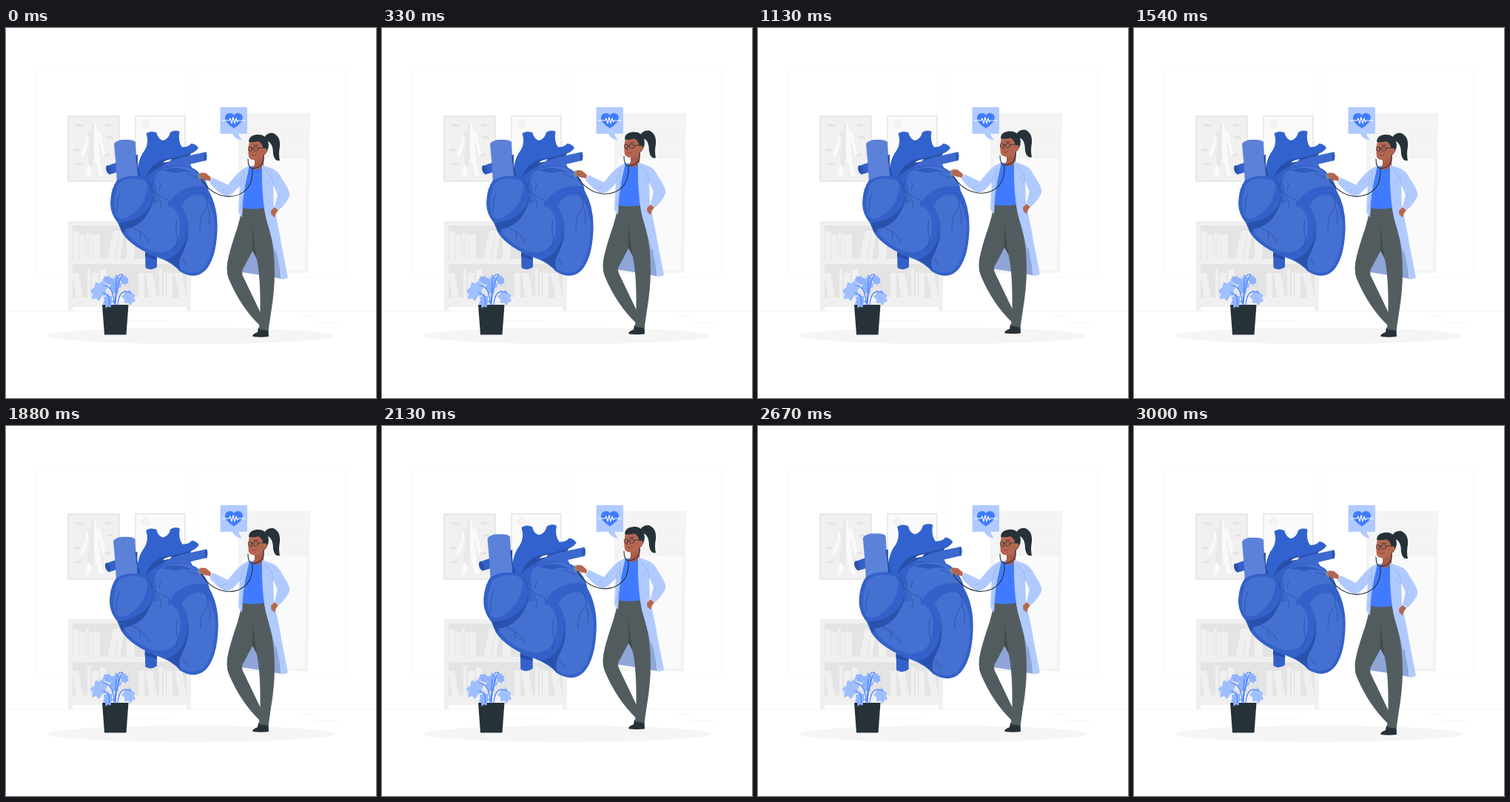
These frames come from a looping animation (500 by 500 pixels, 3.04 s). An HTML page:

```html
<!DOCTYPE html>
<html lang="en">
<head>
<meta charset="utf-8">
<title>Cardiology check</title>
<style>
  html, body { margin: 0; width: 100%; height: 100%; overflow: hidden; background: #fff; }
  svg { display: block; width: 100%; height: 100%; }
  .line { fill: none; stroke-linecap: round; stroke-linejoin: round; }
</style>
</head>
<body>
<svg viewBox="0 0 500 500">
  <!-- room -->
  <g fill="none" stroke="#f9f9f9">
    <rect x="39.5" y="55.5" width="203" height="282" rx="2"/>
    <rect x="254.5" y="55.5" width="204" height="282" rx="2"/>
    <path stroke="#f5f5f5" d="M0 382.500H500M165 395.500H224M400 389.500H416M417 398.500H448"/>
  </g>
  <ellipse cx="250" cy="416" rx="194" ry="11" fill="#f5f5f5"/>

  <!-- anatomy poster -->
  <rect x="84" y="119" width="69" height="88" fill="#f0f0f0" stroke="#e4e4e4" stroke-width="1.600"/>
  <path class="line" stroke="#fafafa" stroke-width="4" d="M112 142L108 158L103 172M126 142L129 157L133 172"/>
  <path d="M115 130Q119 124 122.500 130L122 137L128 140L125 155L126 168L128 184L132 200H126L119 172L114 201H107L111 183L111 168L113 155L110 140L116 137Z" fill="#fafafa"/>
  <path d="M119 127V172L116 190L111 183L111 168L113 155L110 140L116 137L115 130Z" fill="#e8e8e8"/>
  <path d="M94 131.500H104M133 131.500H142M136 148H145M91 165H100M133 172H141M93 184H103" stroke="#e4e4e4" stroke-width="3"/>

  <!-- small poster -->
  <rect x="175" y="119" width="67" height="88" fill="#fafafa" stroke="#e6e6e6" stroke-width="1.600"/>
  <circle cx="188.500" cy="129" r="6.500" fill="#f3f3f3"/>

  <!-- window blind -->
  <path d="M314 115H411L408 331H314Z" fill="#f3f3f3"/>
  <path d="M319 119H407L404 327H319Z" fill="#fafafa"/>
  <path d="M315 116H410L409 176H315Z" fill="#f5f5f5"/>
  <g id="slats" stroke="#f0f0f0" stroke-width=".8"></g>

  <!-- shelf -->
  <path d="M84 261H250V383H244V377H90V383H84Z" fill="#f0f0f0"/>
  <path d="M90 267H244V312H90ZM90 319H244V364H90Z" fill="#e4e4e4"/>
  <g id="books" fill="#f0f0f0"></g>

  <!-- heart -->
  <g id="heart">
    <path d="M188 296H204V323Q196 329 188.500 324Z" fill="#3461c9"/>
    <path d="M188 304L204 310V313L188 309Z" fill="#264da8"/>
    <path d="M136 186.500L153 180.500V194L140 198Q134 194 136 186.500Z" fill="#3461c9"/>
    <ellipse cx="138.500" cy="191.500" rx="3" ry="6" transform="rotate(-18 138.500 191.500)" fill="#2a52ad"/>
    <path d="M177 206Q177 178 187 166Q192 158 191 149L189.500 142.500Q195 138 203.500 141.500Q205 150 212 152Q220 150 222 141Q228 137 234.500 140Q232 153 238 161Q247 161 250.500 156Q257 157 260 162Q256 168 247 171L233 176Q211 177 207 208Z" fill="#3162cd"/>
    <path d="M188 207Q194 181 217 177Q236 174 250 169L246 178L217 183Q207 190 204 211Z" fill="#284fa9"/>
    <path d="M212 182Q216 177.500 224 177.500L221 180.500Z" fill="#f7f7f7"/>
    <path d="M202 194Q216 180 240 174L270 167.500Q272 173 270.500 179L249 184L256 199L208 213Z" fill="#3d69cf"/>
    <ellipse cx="269.500" cy="173.500" rx="2" ry="6" fill="#2d57b6"/>
    <path d="M150 210L148.500 185L146 156.500Q150 150.500 161 151Q172 150.500 175 154L176.500 185L179 210L164 222Z" fill="#5b82d8"/>
    <path d="M175 172L178 171Q177 190 182 199L179 208Z" fill="#284fa9"/>
    <path d="M150 206Q166 196 190 202Q201 188 219 186Q246 184 257 192Q272 205 274 220Q287 243 285.500 274Q284 311 270 327Q256 341.500 235 329Q226 318 208 311Q170 297 157 277L151 263Q139 249 141.500 230Q143 215 150 206Z" fill="#3461c9"/>
    <path d="M152 210Q166 200 185 205Q195 210 189 225Q185 243 167 254Q155 262 149 253Q142 238 152 210Z" fill="#4470d1"/>
    <path d="M190 205Q204 215 195 240Q180 262 152 263L157 276Q183 270 193 248Q205 225 190 205Z" fill="#2951ae"/>
    <path d="M199 237Q218 233 230 247Q239 263 232 287Q225 303 207 303Q184 300 166 281L160 272Q184 268 194 246Z" fill="#4470d1"/>
    <path d="M204 196Q222 184 246 188Q265 197 271 214Q252 212 238 219Q223 227 219 241Q209 239 203 232Q197 214 204 196Z" fill="#4470d1"/>
    <path d="M237 240Q248 222 267 226Q283 246 282 274Q280 309 266 326Q249 337 232 323Q227 317 222 315Q240 309 246 284Q249 258 237 240Z" fill="#4470d1"/>
    <path d="M243 262Q247 280 238 296Q230 309 216 313L236 327Q231 318 239 303Q249 284 243 262Z" fill="#2951ae"/>
    <path d="M212 193Q229 184 254 196Q240 192 230 196Z" fill="#2f5abc"/>
    <g class="line" stroke="#274b9f" stroke-width=".7">
      <path d="M197 207Q205 213 201 222Q210 229 219 232L221 242M201 222L209 235V245M209 211L207 219"/>
      <path d="M265 222Q273 230 272 242Q277 252 274 264M272 242Q261 253 262 272"/>
      <path d="M231 260Q228 272 232 287L229 299M171 270Q185 274 194 290M181 275L182 284M154 224Q149 235 150 250M238 312L245 322M245 197L258 202"/>
    </g>
  </g>

  <!-- plant -->
  <path d="M130 374H165.500L162.500 414.500H133Z" fill="#263238"/>
  <g id="leaves"></g>
  <path class="line" stroke="#407bff" stroke-width="1.100" d="M146 374Q146 350 132 347M148 374Q150 344 157 334M151 374Q153 350 169 358M140 374Q140 359 131 358M147 372L149 342M150 339Q154 329 159 335"/>

  <!-- speech bubble -->
  <path d="M291 107H324.500Q326 107 326 108.500V141.500Q326 143 324.500 143H314L318.500 152Q309 150 306 143H291Q289.500 143 289.500 141.500V108.500Q289.500 107 291 107Z" fill="#b0caff"/>
  <path d="M308 135.500Q295.500 128 296 121Q297 115 302.500 115Q306.500 115 308 118Q309.500 115 313.500 115Q319 115 320 121Q320 128 308 135.500Z" fill="#407bff"/>
  <path class="line" stroke="#fff" stroke-width="1.100" d="M292.500 125H301.500L303 122L305 129L307 120.500L309 129L311 122L312.500 127L314 125H323"/>

  <!-- doctor -->
  <g id="doctor">
    <path d="M334 290L350 255L362 262L372 339L345 334L318 330Z" fill="#8fa5d8"/>
    <path d="M345 190L361 235L381 337.500L373 340L365 300L349 258Z" fill="#b0caff"/>

    <path d="M341 405L354.500 406L355 417Q345 418.500 333.500 417Q332 414 340 411Z" fill="#263238"/>
    <path d="M319 242H341L337 294L321 324Q317 330 321 337L345 387L343 402Q317 377 301 339Q296 327 301 308Q305 292 312 272Q317 257 319 242Z" fill="#525c5f"/>
    <path d="M331 243H349Q351 260 357 274Q363 302 363 330Q363 356 358 385L354.500 409L342 407L343.500 382Q344 343 340 318Q332 285 331 243Z" fill="#535d60"/>
    <path d="M334 256Q333 280 339 312L332.500 300Z" fill="#414b4e"/>

    <path d="M327 187L346 186L349 243Q334 246 318.500 243Z" fill="#407bff"/>
    <path d="M336 174L349 168L348 186Q342 194 333 190L336 184Z" fill="#a95c48"/>
    <path d="M329 186L321 190Q312 196 300 212L279 202L275 209Q286 223 297 227Q304 228 316 213L314 249L319 256L321 222Z" fill="#b0caff"/>
    <path class="line" stroke="#8eacec" stroke-width=".7" d="M316 213L319 202M321 194L322 214L318 245M291 220L298 217"/>

    <path d="M346 185L360 190Q368 193 373 204Q383 218 383.500 226Q380 236 369 246L363 241L367 225L361 212L362 241L371 285L364 304L353 262Q345 234 346 185Z" fill="#b0caff"/>
    <path class="line" stroke="#8eacec" stroke-width=".7" d="M350 191L358 201L354 207L359 213M361 212L359 201M367 225L370 228"/>
    <path d="M363 242L368 246L364.500 251L363 256L358.500 252L358 247Z" fill="#b56650"/>

    <path d="M277 202L270 196L263 195.500L262 198L266 200L260 200L261 203L269 205L276 207Z" fill="#b56650"/>

    <!-- head -->
    <path d="M349 148Q353 141 361 142Q371 146 370 160Q368 171 370 179Q363 181 361 170Q361 156 354 153Z" fill="#263238"/>
    <path d="M330 150Q338 147 349 151L352 165Q350 175 341 178Q331 180 328 174Q326 162 330 150Z" fill="#b56650"/>
    <path d="M328 154Q328 145 339 144Q350 143 354 153Q357 162 350 171L348 164Q347 156 341 153Q336 155 328 154Z" fill="#263238"/>
    <ellipse cx="350" cy="166" rx="2.600" ry="3.500" fill="#b56650"/>
    <g class="line" stroke="#263238" stroke-width=".8">
      <ellipse cx="337.500" cy="163.300" rx="3.200" ry="3"/>
      <ellipse cx="329.800" cy="163.300" rx="2.500" ry="3"/>
      <path d="M332 162.500H334M341 162.500L350 161M335 158.500L340 158.500"/>
      <path stroke="#7d3f35" d="M332.500 164L331 168H333M332 172Q335 174 338 171"/>
    </g>

    <!-- stethoscope -->
    <path class="line" stroke="#263238" stroke-width="1.100" d="M327 177Q327 189 333 190M348 172Q350 188 333 190Q334 207 326 217Q315 229 298 227.500Q276 225 263 203"/>
    <ellipse cx="261.500" cy="200.500" rx="2.100" ry="4.300" transform="rotate(-18 261.500 200.500)" fill="#7b8c91"/>
    <path d="M262 198L271 198L277 204L270 206L264 203Z" fill="#b56650"/>
  </g>
</svg>

<script>
const byId = id => document.getElementById(id);
const LOOP = 3040;
const BOB = { period: LOOP / 2, height: 8.6 };
const BEAT = { start: 1660, peak: 2480, end: LOOP, growth: 0.09, x: 210, y: 237 };

const ease = p => (1 - Math.cos(Math.PI * Math.min(1, Math.max(0, p)))) / 2;

// Each book: left edge, width, height, lean of its top edge
const book = floor => ([x, w, h, lean]) =>
  `<path d="M${x} ${floor}l${lean} ${-h}h${w}l${-lean} ${h}z"/>`;
const upperRow = [[91, 7, 37, 0], [99, 9, 33, 0], [109, 3, 38, 0], [113, 4, 33, 0],
  [118, 9, 33, 0], [137, 9, 38, 8], [148, 6, 38, 6], [163, 10, 33, 0]];
const lowerRow = [[95, 9, 33, -6], [110, 4, 39, 0], [116, 9, 33, 0], [127, 8, 38, 0],
  [179, 8, 33, 0], [194, 10, 33, -6], [207, 4, 38, 0], [213, 3, 34, 0],
  [217, 8, 33, 0], [234, 10, 33, -6]];
byId('books').innerHTML = upperRow.map(book(312)).join('') + lowerRow.map(book(364)).join('');

byId('slats').innerHTML = Array.from({ length: 20 }, (_, i) =>
  `<path d="M316 ${117.5 + i * 3}H410"/>`).join('');

// Lobed leaf around a centre
function leaf([x, y, rx, ry, turn, color]) {
  const points = Array.from({ length: 48 }, (_, i) => {
    const a = i * Math.PI / 24;
    const r = 0.86 + 0.14 * Math.cos(7 * a);
    return `${(rx * r * Math.cos(a)).toFixed(1)},${(ry * r * Math.sin(a)).toFixed(1)}`;
  });
  return `<polygon points="${points.join(' ')}" fill="${color}"
    transform="translate(${x} ${y}) rotate(${turn})"/>`;
}
byId('leaves').innerHTML = [
  [148, 347, 8, 14, 12, '#8fb3ff'],
  [126, 355, 11, 15, 32, '#a0bfff'],
  [138, 341, 8, 6, 25, '#8fb3ff'],
  [160, 341, 6, 7, -25, '#8fb3ff'],
  [166, 364, 9, 11, -25, '#a0bfff'],
  [138, 369, 7, 10, 8, '#8fb3ff'],
].map(leaf).join('');

function draw(t) {
  const lift = BOB.height * (1 - Math.cos(2 * Math.PI * t / BOB.period)) / 2;
  byId('doctor').setAttribute('transform', `translate(0 ${-lift})`);

  const { start, peak, end, growth, x, y } = BEAT;
  const swell = t < peak ? ease((t - start) / (peak - start)) : ease((end - t) / (end - peak));
  byId('heart').setAttribute('transform',
    `translate(${x} ${y}) scale(${1 + growth * swell}) translate(${-x} ${-y})`);
}

const began = performance.now();
function tick() {
  draw((performance.now() - began) % LOOP);
  requestAnimationFrame(tick);
}
tick();
</script>
</body>
</html>
```
